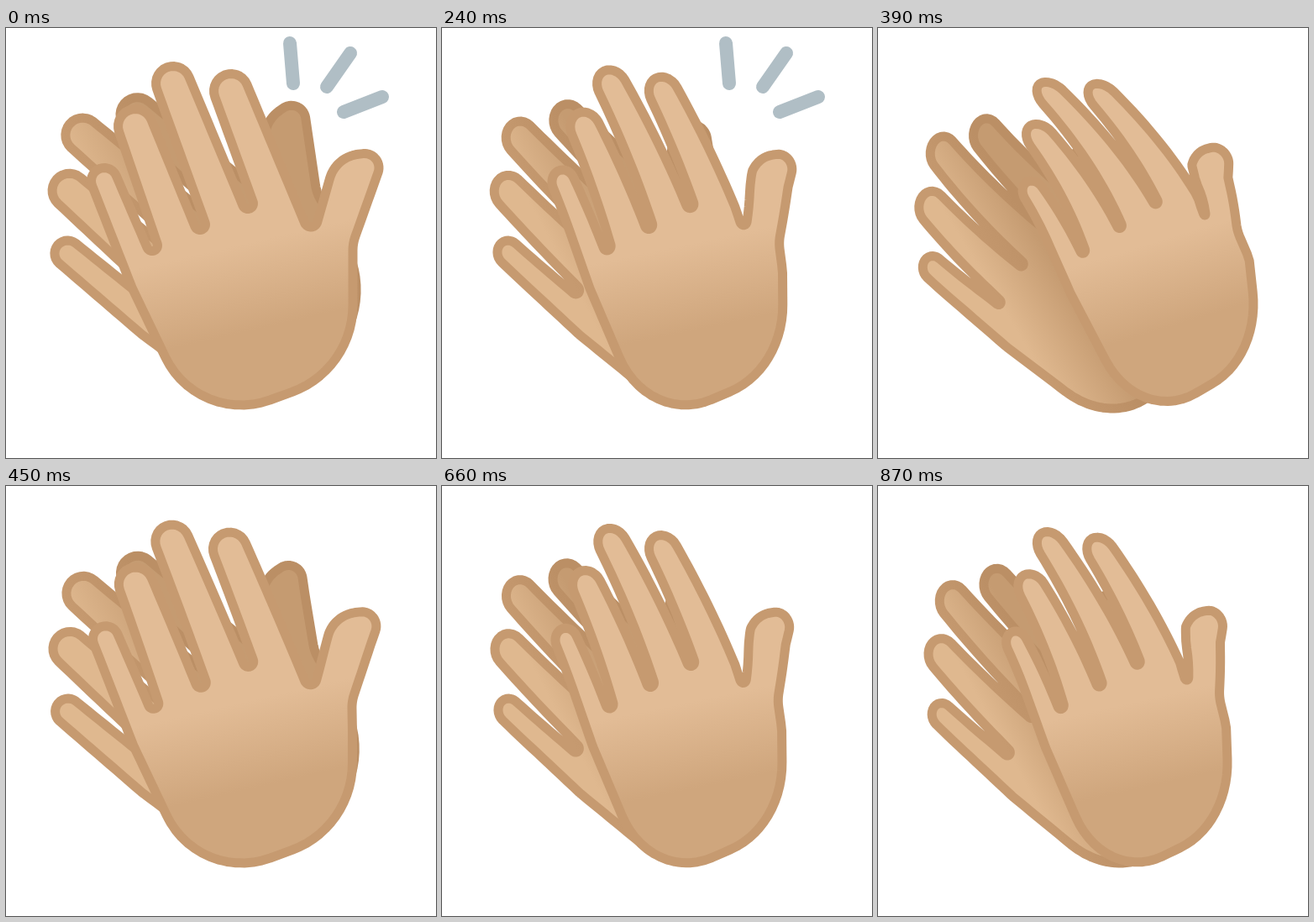
Write an HTML page with a canvas that moves like this. It is 512 px wide and 512 px high and loops after 0.9 s.

```html
<!DOCTYPE html>
<html>
<head>
<meta charset="utf-8">
<style>
html, body { margin: 0; height: 100%; overflow: hidden; background: #fff }
canvas { display: block; width: 512px; height: 512px }
</style>
</head>
<body>
<canvas id="stage" width="512" height="512"></canvas>
<script>
const ctx = document.getElementById('stage').getContext('2d');
const LOOP = 900, CLAP = 225.5, STEP = 30, TAU = 2 * Math.PI;
const KNUCKLE = { x: 231, y: 233 };

const mix = (a, b, k) => a + (b - a) * k;
const clamp = v => Math.max(0, Math.min(1, v));

// Both hands share one shape; they differ in placement, curl and colour.
const back = {
  from: { x: 198, y: 260, turn: -28 }, to: { x: 160, y: 286, turn: -34 }, curl: -.45,
  axis: [[175, 233], [272, 233]],
  fill: ['#dfb88f', '#c59b71'], stroke: ['#c69a70', '#bb8f65']
};
const front = {
  from: { x: 231, y: 233, turn: 0 }, to: { x: 306, y: 234, turn: -11 }, curl: 1,
  axis: [[270, 260], [293, 360]],
  fill: ['#e2bc96', '#cfa67d'], stroke: ['#c69a70', '#c69a70']
};

const wideSparks = [[338, 18, 342, 66], [382, 70, 410, 30], [402, 100, 448, 82]];
const tallSparks = [[362.5, 16, 356.5, 63], [390, 87, 428, 55]];

// The outline is a belt around circles; a negative radius makes a hollow.
function handCircles(bend) {
  const tips = [[117, 182], [154, 117], [199, 66], [268, 75]];
  const fingers = tips.flatMap(([x, y], i) => [
    { x, y, r: i ? 20.5 : 15.5 },
    i < 3 ? { x: 174 + 57 * i, y: 259 - 25 * i, r: -6.5 + 3.5 * bend }
          : { x: 363, y: 229, r: -8 + 5 * bend }
  ]);
  const thumb = [{ x: 424, y: 190, r: 40 }, { x: 427, y: 166.5, r: 17 }, { x: 463, y: 265, r: -50 }];
  const palm = [{ x: 303, y: 330, r: 110 }, { x: 280, y: 349, r: 100 }, { x: 205, y: 285, r: 60 }];
  return [...fingers, ...thumb, ...palm];
}

// Heading of the straight run between two neighbouring circles.
function heading(a, b) {
  const dx = b.x - a.x, dy = b.y - a.y;
  const s = (a.r - b.r) / Math.hypot(dx, dy);
  return Math.atan2(dy, dx) + Math.asin(Math.max(-1, Math.min(1, s)));
}

function beltPoints(circles) {
  const n = circles.length, points = [];
  const runs = circles.map((c, i) => heading(c, circles[(i + 1) % n]));
  circles.forEach((c, i) => {
    const start = runs[(i + n - 1) % n], sign = Math.sign(c.r);
    let turn = (((runs[i] - start) * sign) % TAU + TAU) % TAU;
    if (turn > 5) turn -= TAU;
    for (let k = 0; k <= 14; k++) {
      const a = start + sign * turn * k / 14;
      points.push([c.x + c.r * Math.sin(a), c.y - c.r * Math.cos(a)]);
    }
  });
  return points;
}

// Extra points let straight edges curve when the fingers bend.
function subdivide(points) {
  return points.flatMap((p, i) => {
    const q = points[(i + 1) % points.length];
    const count = Math.ceil(Math.hypot(q[0] - p[0], q[1] - p[1]) / 10) || 1;
    return Array.from({ length: count }, (_, k) =>
      [mix(p[0], q[0], k / count), mix(p[1], q[1], k / count)]);
  });
}

function placer(hand, open, bend) {
  const squeeze = 1 - .18 * Math.min(1, 3.5 * open);
  const turn = mix(hand.from.turn, hand.to.turn, open * open) * Math.PI / 180;
  const cos = Math.cos(turn), sin = Math.sin(turn);
  const originX = mix(hand.from.x, hand.to.x, open);
  const originY = mix(hand.from.y, hand.to.y, open);
  return ([px, py]) => {
    const height = Math.max(0, 240 - py);
    const thumb = clamp((px - 350) / 40) * clamp((290 - py) / 100);
    const x = (px - KNUCKLE.x) * squeeze - bend * (hand.curl * height ** 2 / 700 + 38 * thumb);
    const y = py - KNUCKLE.y + .06 * bend * height;
    return [originX + x * cos - y * sin, originY + x * sin + y * cos];
  };
}

function drawHand(hand, open) {
  const bend = open ** .7;
  const place = placer(hand, open, bend);
  const [start, end] = hand.axis.map(place);
  const blend = ([from, to]) => {
    const g = ctx.createLinearGradient(...start, ...end);
    g.addColorStop(0, from);
    g.addColorStop(1, to);
    return g;
  };
  ctx.beginPath();
  for (const p of subdivide(beltPoints(handCircles(bend)))) ctx.lineTo(...place(p));
  ctx.closePath();
  ctx.fillStyle = blend(hand.fill);
  ctx.fill();
  ctx.strokeStyle = blend(hand.stroke);
  ctx.lineWidth = 11;
  ctx.stroke();
}

function drawSparks(sparks) {
  ctx.strokeStyle = '#b0bec5';
  ctx.lineWidth = 16;
  ctx.beginPath();
  for (const [x0, y0, x1, y1] of sparks) {
    ctx.moveTo(x0, y0);
    ctx.lineTo(x1, y1);
  }
  ctx.stroke();
}

function draw(t) {
  const phase = t % CLAP;
  const open = Math.sin(Math.PI * phase / CLAP);
  ctx.clearRect(0, 0, 512, 512);
  ctx.lineCap = ctx.lineJoin = 'round';
  drawHand(back, open);
  drawHand(front, open);
  if (phase < 60) drawSparks(wideSparks);
  else if (phase < 120) drawSparks(tallSparks);
}

function tick() {
  const t = performance.now() % LOOP;
  draw(Math.floor(t / STEP) * STEP);
  requestAnimationFrame(tick);
}
tick();
</script>
</body>
</html>
```
